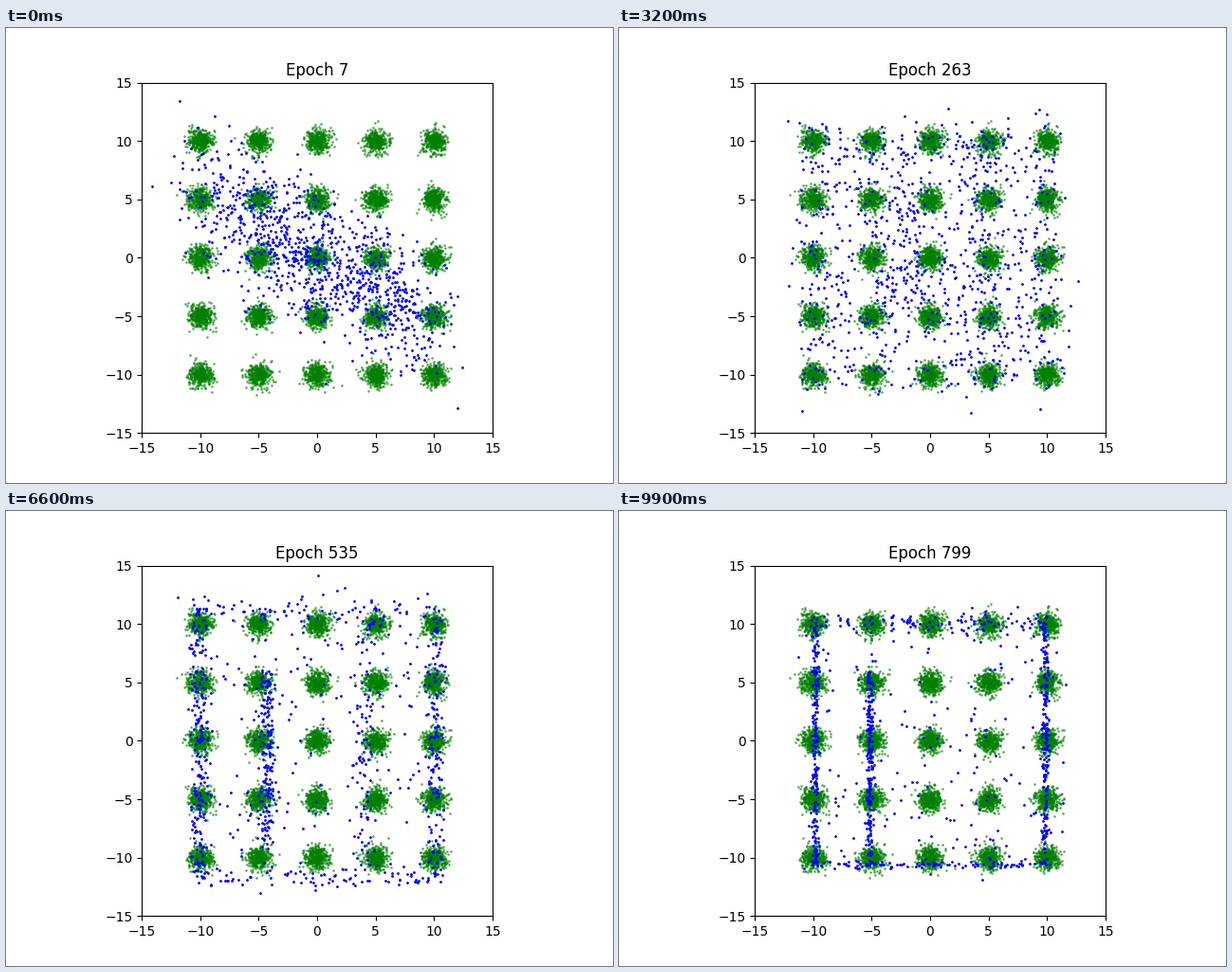
These frames come from a looping animation (640x480 px, 10 s). A matplotlib script:

```python
import numpy as np
import matplotlib.pyplot as plt
from matplotlib.animation import FuncAnimation

FRAMES = 100
N_FAKE = 1000
N_REAL = 400
SPREAD = 21  # frames until the first cloud fills the view


def wave(i, peak, period):
    return np.cos(2 * np.pi * (i - peak) / period)


def diagonal(u, noise):
    x = 9.5 * (2 * u - 1) + 1.7 * noise[:, 0]
    return np.column_stack([x, .2 - .55 * x + 2.8 * noise[:, 1]])


def strands(i, u, v, w, noise):
    """Sheet that folds into walls, inner strands and edge bands."""
    p = i / FRAMES
    late = max(i - SPREAD, 0)
    blur = .15 + 2.2 * (1 - p) ** 2.2
    half_w = (10.3 - .45 * wave(i, 58, 42)) * (.82 + .18 * min(late / 20, 1))
    half_h = 10.5 + 4 * np.exp(-late / 40) * wave(i, SPREAD, 44)
    inner = -3.6 - 1.6 * wave(i, 99, 28)

    span = half_h * (1 - 2 * v)
    across = half_w * (2 * v - 1)
    low, high = -(.2 + .8 * p) * half_h, .55 * half_h
    fuzz = blur * noise
    parts = np.array([
        np.column_stack([-half_w + 0 * v, span]) + fuzz,
        np.column_stack([inner + 0 * v, low + (high - low) * v]) + fuzz,
        np.column_stack([across, -half_h + 0 * v]) + fuzz,
        np.column_stack([across * .95, half_h * (2 * w - 1)]),
        np.column_stack([across, half_h - .5 + 0 * v]) + fuzz + .3 * noise,
        np.column_stack([4 + 0 * v, span * .9]) + 1.5 * fuzz,
        np.column_stack([half_w + 0 * v, span]) + fuzz,
    ])
    haze = .1 + .5 * np.exp(-late / 25)
    weights = np.array([.24, .22, .09, 0, .1, .3 * (1 - p), .21])
    weights *= (1 - haze) / weights.sum()
    weights[3] = haze
    kind = np.searchsorted(np.cumsum(weights)[:-1], u)
    return parts[kind, np.arange(len(u))]


def fake_points(i):
    rng = np.random.default_rng(500 + i)
    u, v, w = rng.random((3, N_FAKE))
    noise = rng.standard_normal((N_FAKE, 2))
    t = min(i / SPREAD, 1)
    pts = (1 - t) * diagonal(u, noise) + t * strands(i, u, v, w, noise)
    pts *= 1 + .25 * np.sin(np.pi * t)
    stray = rng.random(N_FAKE) < .03
    pts[stray] += rng.normal(0, 1.1, (stray.sum(), 2))
    return pts


def real_points():
    rng = np.random.default_rng(25)
    grid = np.arange(-10, 11, 5)
    centers = np.array([(x, y) for x in grid for y in grid])
    return np.repeat(centers, N_REAL, axis=0) + rng.normal(
        0, .5, (len(centers) * N_REAL, 2))


fig, ax = plt.subplots(figsize=(6.4, 4.8), dpi=100)
ax.set_aspect("equal")
ticks = np.arange(-15, 16, 5)
ax.set(xlim=(-15, 15), ylim=(-15, 15), xticks=ticks, yticks=ticks)
ax.plot(*real_points().T, "g.", markersize=2, alpha=.5)
fake, = ax.plot([], [], "b.", markersize=2)
title = ax.set_title("Epoch 7", pad=5.28)


def update(i):
    fake.set_data(*fake_points(i).T)
    title.set_text(f"Epoch {7 + 8 * i}")
    return fake, title


anim = FuncAnimation(fig, update, frames=FRAMES, interval=100,
                     repeat=True, repeat_delay=0, blit=False)
plt.show()
```
